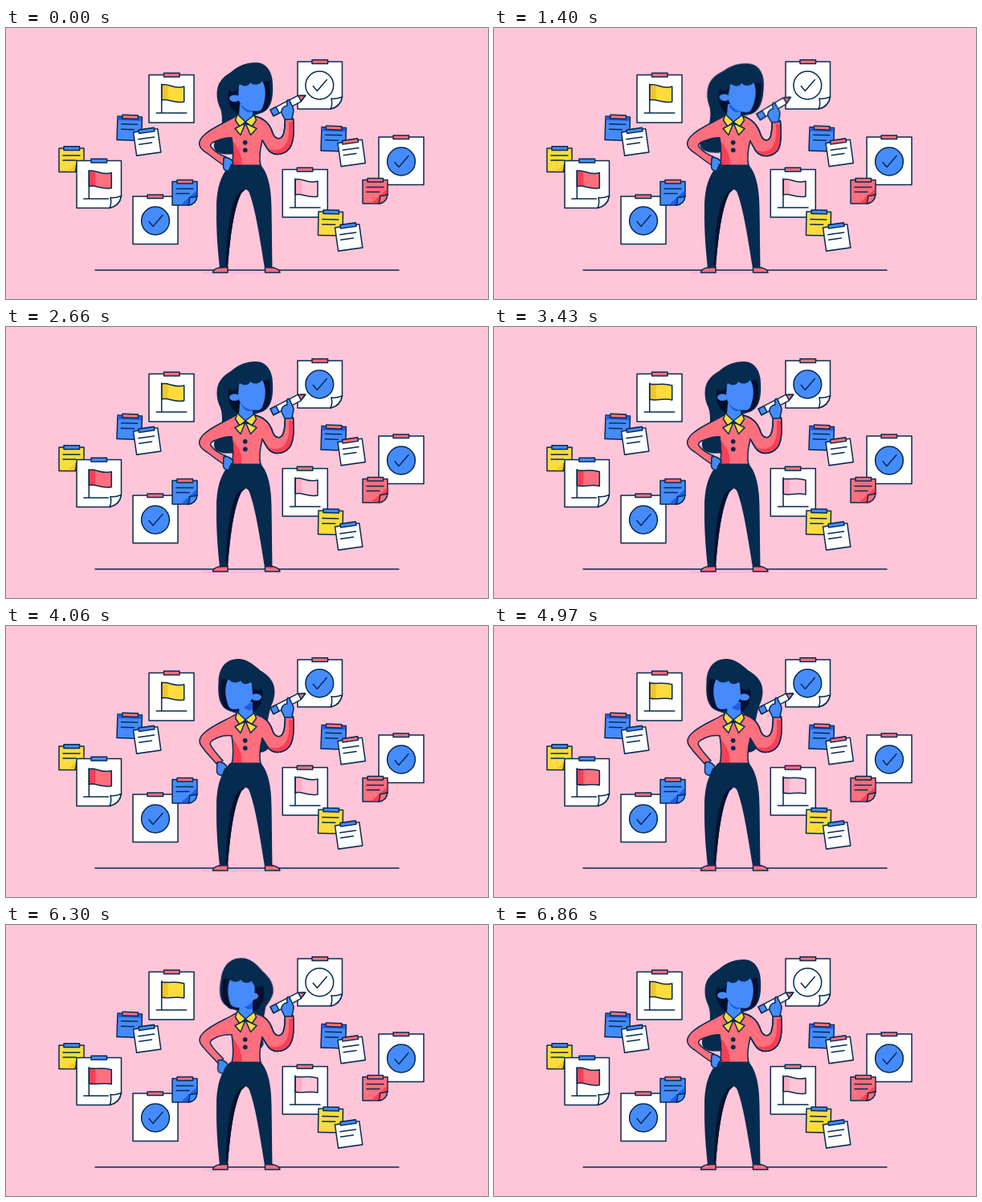
Animation, 600 px wide and 338 px high, one loop 6930 ms. Source, as an HTML page without scripts:

```html
<!DOCTYPE html>
<html lang="en">
<head>
<meta charset="utf-8">
<title>Planning board</title>
<style>
html, body { margin: 0; width: 100%; height: 100%; overflow: hidden; background: #ffc5d9; }
svg { display: block; width: 100vw; height: 100vh; }
:root {
  --navy: #052b4f; --dark: #04102f; --blue: #458bfc; --deep: #1f5fe0;
  --coral: #ff6f7d; --red: #f73f55; --yellow: #ffdc3c;
}

.ln { stroke: var(--navy); stroke-width: 1.5; stroke-linecap: round; stroke-linejoin: round; }
.none { fill: none; }
.white { fill: #fff; }
.navy { fill: var(--navy); }
.dark { fill: var(--dark); }
.blue { fill: var(--blue); --shade: var(--deep); }
.deep { fill: var(--deep); }
.coral { fill: var(--coral); --shade: var(--red); }
.red { fill: var(--red); }
.yellow { fill: var(--yellow); --shade: #f6c52a; }
.shade { fill: var(--shade); }

.nod, .cap, .lock, .depth, .face, .bangs, .ear, .hip-arm, .hip-hand,
.draw-arm, .draw-shade, .draw-hand, .dot, .ring {
  animation: 6.93s ease-in-out infinite;
}
.nod { animation-name: nod; transform-origin: 298px 115px; }
.cap { animation-name: cap; }
.lock { animation-name: lock; }
.depth { animation-name: depth; }
.face { animation-name: face; }
.bangs { animation-name: bangs; }
.ear { animation-name: ear; }
.hip-arm { animation-name: hip-arm; }
.hip-hand { animation-name: hip-hand; }
.draw-arm { animation-name: draw-arm; }
.draw-shade { animation-name: draw-shade; }
.draw-hand { animation-name: draw-hand; transform-origin: 352px 105px; }
.dot { animation-name: dot; }
.ring { animation-name: ring; }
.flag { animation: flag 1.386s ease-in-out infinite; }
.fold { animation: fold 1.386s ease-in-out infinite; }

@keyframes nod {
  0%, 11%, 38%, 49%, 57%, 88.5%, 96.5%, 100% { transform: rotate(0deg); }
  18.5%, 22% { transform: rotate(5deg); }
  28.5%, 31% { transform: rotate(-1deg); }
  52%, 92% { transform: rotate(1deg); }
}
@keyframes cap {
  0%, 49.5%, 96%, 100% { d: path("M311,43 C325,43 332,56 332,70 C333,88 330,102 318,106 C300,112 280,118 272,110 C265,98 262.5,92 262.5,82 C262.5,70 268,62 280,55 C289,47 299,43 311,43Z"); }
  56.5%, 89% { d: path("M289,41 C299,41 307,47 316,55 C328,62 334.5,70 334.5,82 C334,92 332,98 324,110 C316,118 296,112 278,106 C266,102 263,88 264.5,70 C264.5,56 271,41 289,41Z"); }
}
@keyframes lock {
  0%, 49.5%, 96%, 100% { d: path("M290,95 C290,120 300,150 284,157 C270,159 258,156 259,146 C260,134 274,128 267,100Z"); }
  56.5%, 89% { d: path("M331,95 C325,120 322,130 328,146 C329,154 322,158 314,158 C300,150 296,120 300,95Z"); }
}
@keyframes depth {
  0%, 49.5%, 96%, 100% { d: path("M281,72 C273,82 276,98 287,107 L317,105 C328,102 331,88 328,66Z"); }
  56.5%, 89% { d: path("M268,66 C265,88 268,102 279,105 L309,107 C320,98 323,82 315,72Z"); }
}
@keyframes face {
  0%, 49.5%, 96%, 100% { d: path("M290,70 L319,66 C325,76 323,90 319,100 C317,105 310,104 304,103 C297,101 291,96 289,88 C289,82 290,76 290,70Z"); }
  56.5%, 89% { d: path("M277,66 L306,70 C306,76 307,82 307,88 C305,96 299,101 292,103 C286,104 279,105 277,100 C273,90 271,76 277,66Z"); }
}
@keyframes bangs {
  0%, 49.5%, 96%, 100% { d: path("M281,80 C290,79 289,73 291,70 C298,75 303,71 304,68 C310,73 318,70 320,64 L328,66 L318,48 L285,52 L272,70Z"); }
  56.5%, 89% { d: path("M276,64 C278,70 286,73 292,68 C293,71 298,75 305,70 C307,73 306,79 315,80 L324,70 L311,52 L278,48 L268,66Z"); }
}
@keyframes ear {
  0%, 49.5%, 96%, 100% { transform: translate(0, 0); }
  56.5%, 89% { transform: translate(27px, 1px); }
}
@keyframes hip-arm {
  0%, 49.5%, 96%, 100% { d: path("M286,110 C274,118 259,122 246,134 C237,143 240,150 250,156 C257,161 264,167 271,171 L274,161 C266,158 259,153 255,148 C253,144 258,142 264,140 C270,138 276,136 281,137"); }
  56.5%, 89% { d: path("M286,110 C274,118 259,122 246,134 C239,141 240,146 245,152 C250,159 258,167 263,173 L270,168 C264,161 257,154 254.5,148 C253,144 258,142 264,139 C270,137 276,136 281,137"); }
}
@keyframes hip-hand {
  0%, 49.5%, 96%, 100% { transform: translate(0, 0); }
  56.5%, 89% { transform: translate(-8px, 8px); }
}
@keyframes draw-arm {
  0%, 11%, 38%, 100% { d: path("M310,110 C323,113 329,121 332,131 C335,139 342,140 345,133 C347.5,127 347,119 347.5,112 L357.500,113 C359,130 358,143 353,150 C345,160 331,160 325,150 L319,140"); }
  18.5%, 22% { d: path("M310,110 C323,114 329,123 332,133 C335,141 341,142 344,136 C346,130 346,122 346.5,115 L356.500,116 C358,133 358,146 353,153 C345,162 331,162 325,152 L319,141"); }
  28.5%, 31% { d: path("M310,110 C323,112 329,119 332,128 C335,135 343,136 346,129 C349,123 349.500,115 350,108 L360.500,109 C362,126 360,138 354,146 C346,156 331,157 325,148 L319,140"); }
}
@keyframes draw-shade {
  0%, 11%, 38%, 100% { d: path("M357,117 C358.500,130 357.500,143 352.500,149.500 C345,159 332,159 326,150 C335,154 344,152 348,145 C353,137 352,128 352,117Z"); }
  18.5%, 22% { d: path("M356,120 C357.500,133 357.500,146 352.500,152.500 C345,161 332,161 326,152 C335,156 343,154 347,147 C352,140 351,131 351,120Z"); }
  28.5%, 31% { d: path("M360,113 C361.500,126 359.500,138 353.500,145.500 C346,155 332,156 326,148 C335,151 345,149 349,142 C354,134 355,124 355,113Z"); }
}
@keyframes draw-hand {
  0%, 11%, 38%, 100% { transform: translate(0, 0); }
  18.5%, 22% { transform: translate(-2px, 3.5px) rotate(-4deg); }
  28.5%, 31% { transform: translate(4px, -5px) rotate(2deg); }
}
@keyframes dot {
  0%, 29.6%, 82%, 100% { r: 0px; }
  33.5%, 78.5% { r: 17.4px; }
}
@keyframes ring {
  0%, 29.5%, 35%, 100% { r: 17.4px; }
  32% { r: 18.6px; }
}
@keyframes flag {
  0%, 100% { d: path("M0,1 C8,-2 15,7 28,3 L28,22 C15,25 8,17 0,20Z"); }
  50% { d: path("M0,1 C8,3 17,-1 28,3 L28,21 C17,18 8,23 0,20Z"); }
}
@keyframes fold {
  0%, 100% { d: path("M0,1 C3,0 5,0 8,1 L8,19.500 C5,19 3,19 0,20Z"); }
  50% { d: path("M0,1 C3,2 5,2 8,1.500 L8,20.500 C5,21 3,21 0,20Z"); }
}
</style>
</head>
<body>
<svg viewBox="0 0 600 338" preserveAspectRatio="none">
  <defs>
    <rect id="paper" class="ln white" width="56" height="59.5"/>
    <g id="curled" class="ln white">
      <path d="M0,0 H55.500 V44 C54,52 50,57 41,59 H0Z"/>
      <path d="M55.500,44 C50,46 46,47 42,46 C43,50 43,55 41,59 C50,57 54,52 55.500,44Z"/>
    </g>
    <rect id="tape" class="ln" width="19.5" height="4.6"/>
    <path id="check" class="ln none" d="M-8,1 L-3,7 L9,-7"/>
    <path id="pole" class="ln none" d="M0,0 V36 M-6.500,36 H31"/>
    <g id="square">
      <rect class="ln" width="30.5" height="29.5"/>
      <path class="ln none" d="M5,9.500 H25 M5,16 H21"/>
    </g>
    <g id="leaf">
      <path class="ln" d="M0,0 H31 V18 C30,25 27,29 20,29.500 H0Z"/>
      <path class="shade" d="M30.300,11 V18 L21.500,20 L20,28.800 H11Z"/>
      <path class="ln" d="M31,18 C27,20 24,20 21.500,20 C22,24 21,27 20,29.500 C27,29 30,25 31,18Z"/>
      <path class="ln none" d="M5,9 H26 M5,15 H21"/>
    </g>
  </defs>

  <!-- left board -->
  <use href="#paper" x="178" y="58.5"/>
  <use href="#tape" class="coral" x="196.5" y="56.3"/>
  <g transform="translate(193.7 70)">
    <path class="flag yellow"/><path class="fold" fill="#f6c52a"/><path class="flag ln none"/>
    <use href="#pole"/>
  </g>

  <use href="#square" class="blue" transform="translate(139 110) rotate(2)"/>
  <path d="M139,110.500 L169,111.500 V116 L139,115Z" class="deep"/>
  <use href="#tape" class="coral" transform="translate(145 108.3) rotate(2)"/>
  <use href="#square" class="white" transform="translate(158.5 130) rotate(-8)"/>
  <use href="#tape" class="blue" transform="translate(165 127) rotate(-8)"/>

  <use href="#leaf" class="yellow" x="66" y="150"/>
  <use href="#tape" class="blue" x="72" y="147.8"/>
  <use href="#curled" x="88" y="165.5"/>
  <use href="#tape" class="blue" x="106" y="163.3"/>
  <g transform="translate(103.3 177.5)">
    <path class="flag coral"/><path class="fold red"/><path class="flag ln none"/>
    <path class="ln none" d="M0,0 V35.500 M-6.500,35.500 H24"/>
  </g>

  <use href="#paper" x="158" y="210"/>
  <use href="#tape" class="coral" x="176" y="208"/>
  <g transform="translate(186 240.5)"><circle class="ln blue" r="17.4"/><use href="#check"/></g>
  <use href="#leaf" class="blue" x="207" y="191.5"/>
  <use href="#tape" class="coral" x="213" y="189.4"/>

  <!-- right board -->
  <use href="#curled" x="363" y="42"/>
  <use href="#tape" class="coral" x="381" y="39.8"/>
  <g transform="translate(390.3 71.5)">
    <circle class="dot blue"/>
    <circle class="ring ln none"/>
    <use href="#check"/>
  </g>

  <use href="#square" class="blue" transform="translate(393 123.5) rotate(2)"/>
  <path d="M393,124 L423,125 V129.500 L393,128.500Z" class="deep"/>
  <use href="#tape" class="coral" transform="translate(398.5 122) rotate(2)"/>
  <use href="#square" class="white" transform="translate(413 143.5) rotate(-8)"/>
  <use href="#tape" class="coral" transform="translate(418.5 140.5) rotate(-8)"/>

  <use href="#paper" x="464" y="136"/>
  <use href="#tape" class="coral" x="482" y="134"/>
  <g transform="translate(492 166.5)"><circle class="ln blue" r="17.4"/><use href="#check"/></g>
  <use href="#leaf" class="coral" x="444" y="189.5"/>
  <use href="#tape" class="coral" x="450" y="187.5"/>

  <use href="#paper" x="344.3" y="176.5"/>
  <use href="#tape" class="coral" x="362.3" y="174.3"/>
  <g transform="translate(360 188)">
    <path class="flag" fill="#ffc5d9"/><path class="fold" fill="#ffabc2"/><path class="flag ln none"/>
    <use href="#pole"/>
  </g>
  <use href="#square" class="yellow" transform="translate(389 229) rotate(1)"/>
  <use href="#tape" class="blue" transform="translate(395 227) rotate(1)"/>
  <use href="#square" class="white" transform="translate(409.5 249) rotate(-8)"/>
  <use href="#tape" class="blue" transform="translate(416 245.5) rotate(-8)"/>

  <!-- ground -->
  <path d="M244,305.500 H325" stroke="#f6b4dc" stroke-width="2"/>
  <path class="ln" d="M111,302 H489"/>

  <!-- hair behind -->
  <g class="nod navy">
    <path class="lock"/>
    <path class="cap"/>
    <path class="depth dark"/>
  </g>

  <!-- legs -->
  <path class="ln coral" d="M257.500,305 C258,300 264,298 276,298 V305Z M341,305 C340,300 334,298 322.500,298 V305Z"/>
  <path class="navy" d="M279,171 H317 C326,180 330.500,200 330.500,225 C331,250 331,275 331.500,299.500 H322 C316,262 311,228 303,206 C301,200 296,200 293,206 C283,226 279,262 276,299.500 H266 C264,280 261.500,255 262,225 C262,195 270,180 279,171Z"/>
  <path class="dark" d="M298,201.500 C284,202 276,228 273.500,296 L276,299 C279,262 283,226 293,206Z"/>

  <!-- torso and arms -->
  <path class="coral" d="M288,109 L275,120 L281,138 C283,150 284,160 281,173 H317 C314,160 317,148 319,138 L322,118 L311,109Z"/>
  <path class="red" d="M281.500,140 C290,150 294.500,160 293.500,172 H281.500 C284,160 283,150 281.500,140Z"/>
  <path class="ln none" d="M281,137 C283,150 284,160 281,172 M319,140 C317,148 314,160 317,172"/>
  <path class="ln coral hip-arm"/>
  <path class="ln coral draw-arm"/>
  <path class="red draw-shade"/>
  <path class="ln none draw-arm"/>
  <path class="navy" d="M280,170.500 H317.500 L320,177 H274Z"/>
  <circle class="navy" cx="297.7" cy="142.8" r="2.9"/>
  <circle class="navy" cx="297.8" cy="152.3" r="2.9"/>
  <path class="ln blue hip-hand" d="M271,162 C276,160 283,165 283,169 C279,169 280,174 277,178 C272,179 270,175 270.500,171Z"/>

  <!-- drawing hand -->
  <g class="draw-hand">
    <g class="ln" transform="translate(331 106) rotate(-27.6)">
      <path class="white" d="M0,-4.300 H38 L47,0 L38,4.300 H0Z"/>
      <path class="blue" d="M0,-4.300 H8 V4.300 H0Z"/>
      <path class="coral" d="M39,-3.800 L47,0 L39,3.800Z"/>
    </g>
    <path class="ln blue" d="M347,114 L343,106 C342,101 346,97 350,97 C349,92 350,88 353,90 C354,95 357,97 358,102 C358,107 356,110 356,114Z"/>
  </g>

  <!-- neck and bow -->
  <path class="blue" d="M291,95 H307 V110 L298,118 L290,109Z"/>
  <path class="deep" d="M292,96 H307 V104 C302,107 296,104 292,96Z"/>
  <g class="ln yellow">
    <path d="M288,107.500 L298,117 L291,123 L285.500,115Z M309,108.500 L298,117 L306,123 L311.500,115Z"/>
    <path d="M298,118.500 L285,125.500 L292,133.500Z M298,118.500 L304.500,133.500 L312,125.500Z"/>
  </g>

  <!-- head -->
  <g class="nod">
    <ellipse class="ear blue" cx="284.5" cy="87.8" rx="6.5" ry="4.2"/>
    <path class="face blue"/>
    <path class="bangs navy"/>
  </g>
</svg>
</body>
</html>
```
